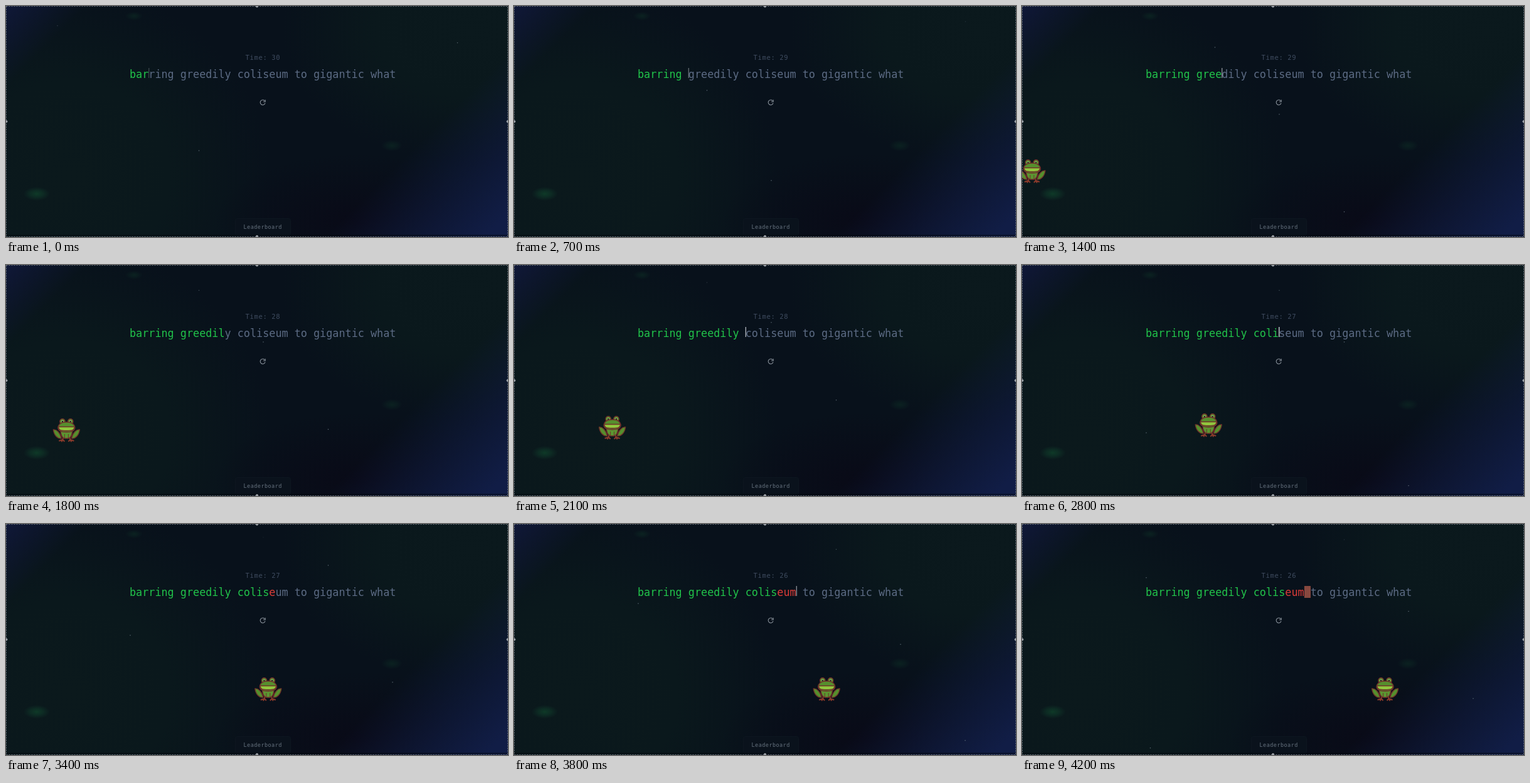
An HTML page for the animation above (4300 ms loop, 800x369 px).

```html
<!DOCTYPE html>
<html lang="en">
<head>
<meta charset="utf-8">
<title>Typing test</title>
<style>
  html, body { margin: 0; width: 100%; height: 100%; overflow: hidden; background: #08111b; }
  svg {
    display: block; width: 800px; height: 369px;
    background:
      linear-gradient(135deg, #101838, #10183800 11%, #111c4400 75%, #111c4488 86%, #111d46 97%),
      radial-gradient(ellipse 230px 110px at 560px 345px, #090a17, #090a1700),
      radial-gradient(ellipse 320px 300px at 100px 270px, #0b191c, #0a181c 50%, #0a181c00),
      radial-gradient(ellipse 300px 210px at 740px 40px, #0b191d, #0a181c 50%, #0a181c00),
      #08111b;
  }
  text { font-family: "DejaVu Sans Mono", monospace; white-space: pre; }
  .ok { fill: #21c34a; }
  .bad { fill: #dc3c38; }
</style>
</head>
<body>
<svg viewBox="0 0 800 369">
  <defs>
    <radialGradient id="glow">
      <stop offset="0" stop-color="#11502f" stop-opacity=".6"/>
      <stop offset=".5" stop-color="#114a30" stop-opacity=".36"/>
      <stop offset="1" stop-color="#114430" stop-opacity="0"/>
    </radialGradient>
    <g id="side">
      <path d="M-21-1C-16-2-10 4-8 13C-14 14-20 8-21-1Z" fill="#568f2d"/>
      <path d="M-4 6L-6 15M-6 15L-12 17M-6 15L-8 18.5M-6 15L-3 18" fill="none" stroke="#8b3a2b" stroke-width="2"/>
      <circle cx="-6.4" cy="-14" r="4.2" fill="#5b9631"/>
      <circle cx="-6.4" cy="-14.2" r="1.8" fill="#a9bd84" stroke="none"/>
      <circle cx="-6.4" cy="-14" r="1.2" fill="#261a1c" stroke="none"/>
    </g>
  </defs>

  <ellipse cx="49" cy="300" rx="21" ry="11" fill="url(#glow)"/>
  <ellipse cx="204" cy="16" rx="14" ry="7" fill="url(#glow)" opacity=".42"/>
  <ellipse cx="615" cy="223" rx="17" ry="9" fill="url(#glow)" opacity=".42"/>
  <g id="motes" fill="#75858d"></g>

  <rect x="365.5" y="339.5" width="88" height="27" rx="3" fill="#0a121c" stroke="#0d1620"/>
  <text x="378.5" y="355.5" font-size="8.5" letter-spacing=".46" fill="#66727f">Leaderboard</text>
  <text id="timer" x="381.5" y="86" font-size="10.5" letter-spacing=".65" fill="#3f4c60"></text>
  <rect id="gap" y="99" height="19" fill="#87483f"/>
  <text x="197" y="114.5" font-size="16.8" fill="#5c6b84"><tspan id="right" class="ok"></tspan><tspan id="wrong" class="bad"></tspan><tspan id="rest"></tspan></text>
  <rect id="caret" y="99" width="1.2" height="16" fill="#e8ecf2"/>

  <g fill="none" stroke="#8a939c" stroke-width="1.1">
    <path d="M412.4 151.6A4 4 0 1 0 413 155.2"/>
    <path d="M413.2 149.8V153H410"/>
  </g>

  <g id="frog" stroke="#70302a" stroke-width="1.4" stroke-linejoin="round">
    <use href="#side"/>
    <use href="#side" transform="scale(-1 1)"/>
    <path d="M-9-2C-10 6-7 12-3 13H3C7 12 10 6 9-2Z" fill="#5b9631"/>
    <path d="M-13.5-4C-13-9-9-13 0-13S13-9 13.5-4C13 2 7 3 0 3S-13 2-13.5-4Z" fill="#568f2d"/>
    <path d="M-13-5.5H13C12.5 0 10 .8 0 .8S-12.5 0-13-5.5Z" fill="#91c83e"/>
    <path d="M-3 6V13M3 6V13" stroke-width="1"/>
  </g>

  <path d="M0 366.5H800" stroke="#03060b" stroke-opacity=".5" stroke-width="2"/>
  <rect x=".5" y=".5" width="799" height="368" fill="none" stroke="#68717b" stroke-dasharray="2 2"/>
  <g fill="#9a9fa5">
    <circle cx="400" cy=".5" r="2"/><circle cx="400" cy="368" r="2"/>
    <circle cx=".5" cy="184.5" r="2"/><circle cx="799.5" cy="184.5" r="2"/>
  </g>
</svg>
<script>
const LOOP = 4300, STEP = 100, CHAR = 10.114, LEFT = 197;
const PHRASE = "barring greedily coliseum to gigantic what";
const FIRST_ERROR = 22;
const el = id => document.getElementById(id);

// [time, value] points
const TYPED = [[0, 3.5], [1400, 12.5], [1800, 15.5], [2400, 19.5], [2800, 21.5], [3400, 23.5], [4200, 26.5], [4300, 26.5]];
const BLINK = [[0, .25], [200, 0], [400, 1], [600, .65], [800, .25]];

// [x, start delay]
const MOTES = [[82, -4000], [719.5, -3500], [307.5, -2000], [410, -1000], [513.5, 0],
               [198, 1035], [616, 1540], [719, 2500], [204.5, 2970]];
const motes = MOTES.map(([x, delay]) => {
  const dot = document.createElementNS("http://www.w3.org/2000/svg", "circle");
  dot.setAttribute("cx", x);
  dot.setAttribute("r", .75);
  el("motes").append(dot);
  return { dot, delay };
});

function interpolate(points, t) {
  const i = Math.max(1, points.findIndex(p => p[0] >= t));
  const [t0, a] = points[i - 1], [t1, b] = points[i];
  return a + (b - a) * (t - t0) / (t1 - t0);
}

// Motes rise, slow down and fade near the top.
function drawMotes(t) {
  for (const { dot, delay } of motes) {
    const left = 4600 - (t - delay);
    const height = 32e-6 * left ** 2 * (1 - 5.5e-16 * left ** 4);
    dot.setAttribute("cy", 20 + height);
    dot.setAttribute("opacity", left > 0 && left < 3600 ? Math.min(.8, left / 1500) : 0);
  }
}

function drawTyping(t) {
  const n = Math.floor(interpolate(TYPED, t));
  const good = Math.min(n, FIRST_ERROR);
  el("right").textContent = PHRASE.slice(0, good);
  el("wrong").textContent = PHRASE.slice(good, n);
  el("rest").textContent = PHRASE.slice(n);
  const space = PHRASE.indexOf(" ", FIRST_ERROR);
  el("gap").setAttribute("x", LEFT + space * CHAR);
  el("gap").setAttribute("width", n > space ? CHAR : 0);
  el("caret").setAttribute("x", LEFT + n * CHAR - .2);
  el("caret").setAttribute("opacity", interpolate(BLINK, t % 800));
  el("timer").textContent = "Time: " + (30 - Math.floor((t + 400) / 1000));
}

function drawFrog(t) {
  const x = 16 + (t - 1400) * .2009;
  const y = 260 - 4 * Math.cos(Math.PI * t / 200);
  el("frog").setAttribute("transform", `translate(${x} ${y})`);
}

function frame(now) {
  const t = Math.floor(now % LOOP / STEP) * STEP;
  drawMotes(t);
  drawTyping(t);
  drawFrog(t);
  requestAnimationFrame(frame);
}
frame(performance.now());
</script>
</body>
</html>
```
